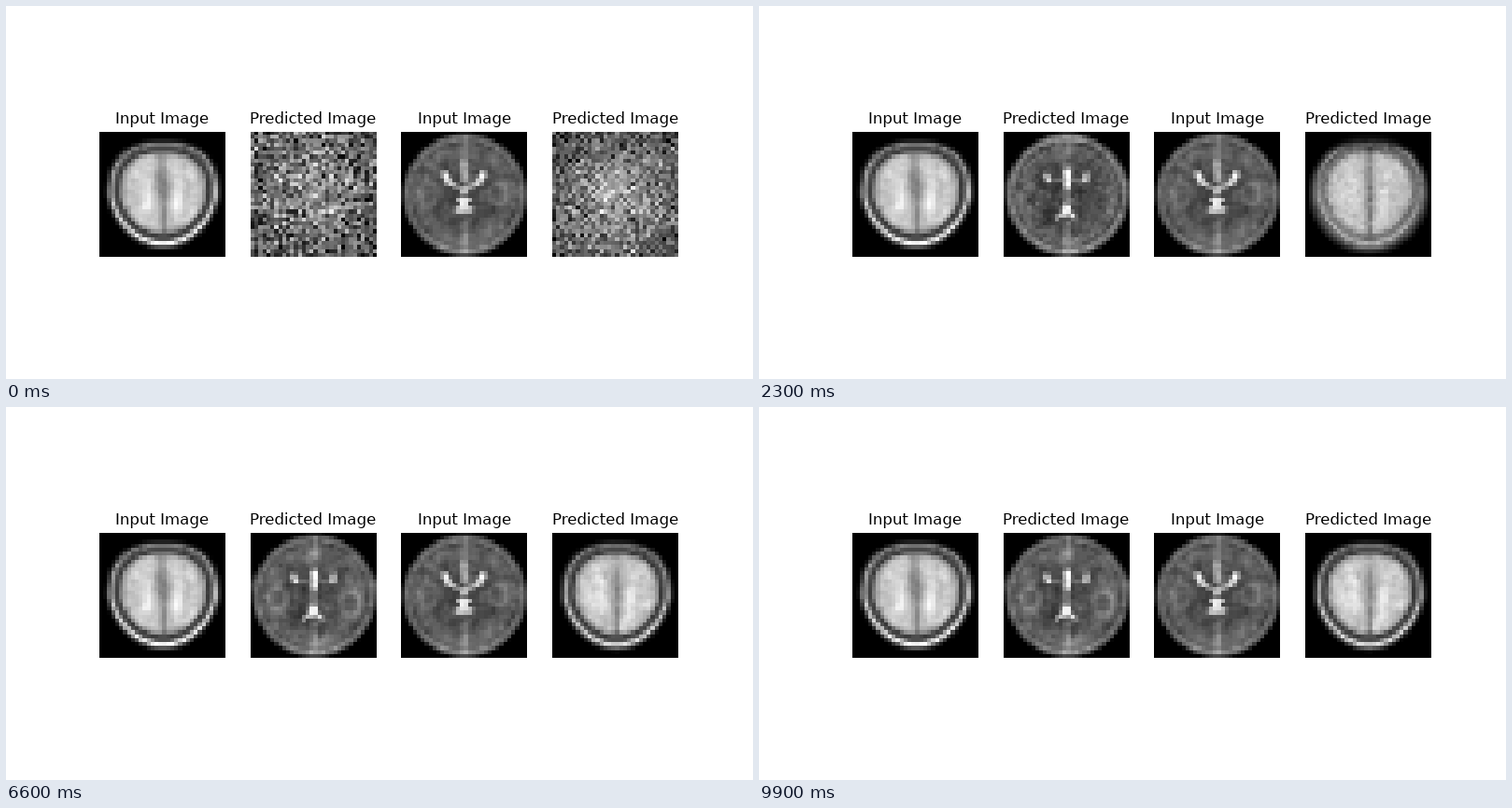
Write a matplotlib script that moves like this. It is 800 px wide and 400 px high and loops after 10 s.

```python
import numpy as np
import matplotlib.pyplot as plt
from matplotlib.animation import FuncAnimation

plt.rcParams["text.hinting"] = "native"

N, FRAMES = 32, 100
Y, X = np.mgrid[0:N, 0:N] + 0.5
rng = np.random.default_rng(7)


def noise():
    return rng.standard_normal((N, N))


def texture():
    """Noise with a slight blur, at unit variance."""
    a = noise()
    for axis in (0, 1):
        a = a + 0.3 * (np.roll(a, 1, axis) + np.roll(a, -1, axis))
    return a / a.std()


def blob(x, y, sx, sy):
    return np.exp(-((X - x) / sx) ** 2 - ((Y - y) / sy) ** 2)


def line(x0, y0, x1, y1, w):
    dx, dy = x1 - x0, y1 - y0
    t = np.clip(((X - x0) * dx + (Y - y0) * dy) / (dx * dx + dy * dy), 0, 1)
    d = np.hypot(X - x0 - t * dx, Y - y0 - t * dy)
    return np.clip(w + 0.5 - d, 0, 1)


def loop(x, y, rx, ry):
    return np.exp(-((np.hypot((X - x) / rx, (Y - y) / ry) - 1) / 0.35) ** 2)


def depth(cx, cy, rx, ry, egg=0.0, square=0.0):
    """Approximate distance inside a head: square top, narrow chin."""
    v = (Y - cy) / ry
    u = np.abs(X - cx) / (rx * (1 - egg * np.clip(v, 0, 1)))
    p = 2 + square * np.clip(-3 * v, 0, 1)
    return (1 - (u ** p + np.abs(v) ** p) ** (1 / p)) * ry


def light_head(cx, cy, rx, ry, scalp):
    low = np.clip((Y - cy) / ry, -1, 1)
    d = depth(cx, cy, rx, ry, 0.1, 0.5) * (1 - 0.12 * low)
    img = np.interp(d, [-0.6, 0.3, 1.0, 2.0, 2.8, 3.6, 4.8],
                    [0, 75, scalp, 80, 55, 150, 200])
    img = np.where(d < 1.8, img * (0.88 + 0.33 * low), img)
    inside = np.clip(d - 3, 0, 1)
    img += inside * 9 * texture()
    for x in (cx - 4.1, cx + 3.7):
        img += inside * 45 * blob(x, cy + 0.4, 1.2, 5)
    img -= inside * (50 * blob(cx, cy - 2.5, 1.9, 6)
                     + 25 * line(cx, 5, cx, 27, 0.6)
                     + 40 * line(cx, 20, cx, 27, 0.5))
    return img, d


def dark_head(cx, cy, rx, ry, rim):
    d = depth(cx, cy, rx, ry)
    img = np.interp(d, [-0.5, 0.4, 1.2, 2.2, 3.2, 5, 7.5],
                    [0, 88, rim, 80, 100, 98, 74])
    inside = np.clip(d, 0, 1)
    img += inside * 9 * texture()
    img += inside * 35 * (line(cx, 24, cx, 31, 0.8) + line(cx, 0, cx, 6, 0.7))
    img += inside * 35 * blob(cx, 30, 11, 2.2)
    return img, d


# Fixed inputs
head_a, _ = light_head(16.2, 16.1, 14.3, 13.7, 225)
head_b, _ = dark_head(16.2, 16.2, 15.6, 15.5, 112)
head_b += 165 * np.maximum.reduce([
    line(11.2, 11, 12.2, 13, 0.7), line(12.4, 13.4, 14.2, 14.1, 0.4),
    line(20.8, 11, 19.8, 13, 0.7), line(19.6, 13.4, 17.8, 14.1, 0.4),
    0.5 * line(16, 8.3, 16, 12.2, 1.1), line(16, 15, 16, 15.8, 0.7),
    line(15, 17.5, 17, 17.5, 0.6), line(16, 18, 16, 19.2, 1.0),
    line(14.4, 20, 17.6, 20, 0.7)])
head_b += 32 * (loop(24.6, 16, 2.4, 2.4) + 0.7 * loop(7, 16, 2, 3))

# Learned results
ventricles = np.maximum.reduce([
    line(10.9, 11.2, 11.3, 12.4, 0.6), line(21.1, 11.2, 20.9, 12.4, 0.6),
    0.3 * line(11.3, 12.6, 20.9, 12.6, 0.3), line(16.2, 10.4, 16.2, 14, 0.8),
    0.5 * line(16, 15, 16, 18.5, 0.5), line(15.9, 19.6, 15.9, 20.6, 1.1),
    line(15.5, 20.4, 13.6, 22, 0.4), line(16.3, 20.4, 18, 22, 0.4)])
pred_b, depth_b = dark_head(16.2, 16.2, 15.6, 15.5, 112)
pred_b += 170 * ventricles + 40 * blob(16.2, 8, 2.2, 2.2)
pred_b += 40 * (loop(25.3, 18.3, 2.4, 3) + 0.8 * loop(6.8, 17, 2.2, 2.8))
pred_b += 60 * (blob(0.3, 13, 0.8, 2) + blob(31.7, 13, 0.8, 2))
pred_a, depth_a = light_head(16.3, 16.2, 14.0, 13.7, 200)

# Half-trained results
rough_b = np.interp(depth_b, [-0.5, 0.4, 1.2, 2.4, 3.4, 4.6, 7],
                    [0, 100, 150, 75, 112, 85, 62])
rough_b += np.clip(depth_b, 0, 1) * 12 * texture()
rough_b += 180 * ventricles + 70 * blob(16.2, 9.5, 1.6, 2.5)
rough_b += 50 * (blob(16, 1.8, 5, 1.5) + line(16, 24, 16, 31, 0.7))
rough_a = np.interp(depth(16.2, 16, 15.2, 15.2), [-0.5, 0.5, 1.4, 2.2, 3.4, 5],
                    [0, 85, 150, 100, 165, 195])
rough_a *= np.interp(Y, [0, 3, 5.5], [0.2, 0.3, 1])
rough_a -= 75 * line(16.4, 5, 16.4, 27, 0.9) + 45 * blob(25, 20, 3, 3)

# Untrained output
checker = (-1.0) ** (np.floor(X) + np.floor(Y))
columns = (-1.0) ** np.floor(X)
start_b = 75 + 70 * blob(16, 14, 14, 14) + 8 * columns
start_a = 70 + 90 * blob(16.5, 16, 14, 14) + 10 * checker


def predictor(start, rough, final, inside, spread):
    n1, n2 = noise(), noise()
    mask = np.clip(inside + 0.5, 0, 1)

    def at(i):
        raw = np.exp(-i / 4)
        half = 1 / (1 + np.exp((i - 23) / 2.5))
        turn = 1.6 * np.log1p(i)
        grain = np.cos(turn) * n1 + np.sin(turn) * n2
        amp = spread * np.exp(-i / 11) + 2
        img = raw * start + (1 - raw) * (half * rough + (1 - half) * final)
        return np.clip(img + amp * grain * (raw + (1 - raw) * mask), 0, 255)

    return at


predict_b = predictor(start_b, rough_b, pred_b, depth_b, 42)
predict_a = predictor(start_a, rough_a, pred_a, depth_a, 36)

fig, axes = plt.subplots(1, 4, figsize=(8, 4), dpi=100)
panels = [("Input Image", head_a), ("Predicted Image", predict_b(0)),
          ("Input Image", head_b), ("Predicted Image", predict_a(0))]
views = []
for ax, (title, img) in zip(axes, panels):
    views.append(ax.imshow(img, cmap="gray", vmin=0, vmax=255))
    ax.set_title(title)
    ax.axis("off")


def update(i):
    views[1].set_data(predict_b(i))
    views[3].set_data(predict_a(i))
    return views


anim = FuncAnimation(fig, update, frames=FRAMES, interval=100,
                     repeat=True, repeat_delay=0)
plt.show()
```
